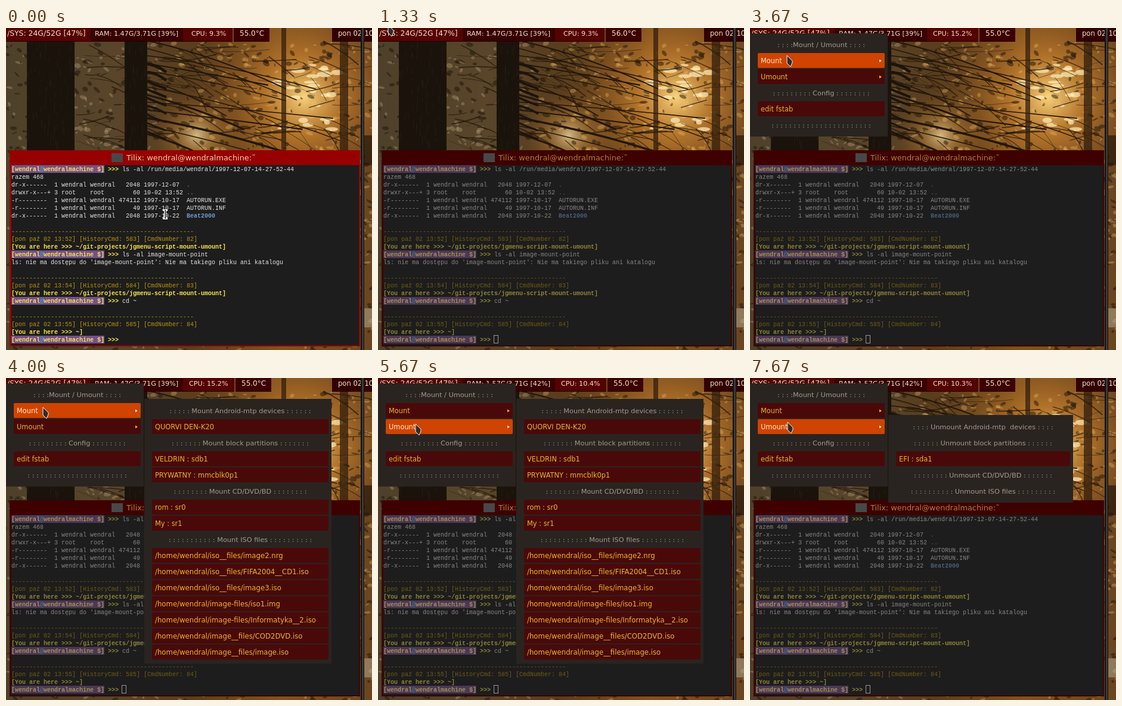
Recreate the animation shown at these times as an HTML page with a canvas. Size 614 by 540 pixels, loop 8000 ms.

```html
<!DOCTYPE html>
<html lang="pl">
<head>
<meta charset="utf-8">
<title>Mount menu</title>
<style>
html, body { margin: 0; width: 100%; height: 100%; overflow: hidden; background: #000; }
canvas { display: block; }
</style>
</head>
<body>
<canvas id="stage" width="614" height="540"></canvas>
<script>
const W = 614, H = 540, LOOP = 8000;
const SANS = '"DejaVu Sans", sans-serif';
const MONO = '"Liberation Mono", monospace';
const USER = 'wendral', HOST = 'wendralmachine';
let ctx = document.getElementById('stage').getContext('2d');

// Step tables: [first step, value]; three steps per second
const CPU = [[0, '9.3'], [5, '12.6'], [6, '14.1'], [7, '16.4'], [8, '15.9'], [9, '15.5'],
  [11, '15.2'], [13, '12.8'], [15, '11.0'], [17, '10.4'], [23, '10.3']];
const TEMP = [[0, 55], [2, 56], [5, 54], [8, 53], [11, 55]];
const RAM = [[0, '1.47G/3.71G [39%]'], [14, '1.57G/3.71G [42%]']];
const POINTER = [[0, [267, 312]], [1, [238, 262]], [2, [130, 120]], [3, [40, 22]], [4, [17, -5]],
  [5, [22, -2]], [6, [35, 5]], [7, [50, 6]], [8, [50, 8]], [10, [50, 26]], [11, [62, 46]],
  [12, [62, 49]], [16, [62, 53]], [17, [63, 77]], [23, [63, 74]]];
const at = (table, k) => table.findLast(e => e[0] <= k)[1];

function rect(x, y, w, h, color) {
  ctx.fillStyle = color;
  ctx.fillRect(x, y, w, h);
}

function text(s, x, y, color, size = 11.4, align = 'left') {
  ctx.font = `${size}px ${SANS}`;
  ctx.textAlign = align;
  ctx.fillStyle = color;
  ctx.fillText(s, x, y);
}

function poly(points, fill, stroke) {
  ctx.beginPath();
  points.forEach(([x, y]) => ctx.lineTo(x, y));
  ctx.closePath();
  ctx.fillStyle = fill;
  ctx.fill();
  if (stroke) { ctx.strokeStyle = stroke; ctx.lineWidth = 1; ctx.stroke(); }
}

function gradient(g, ...stops) {
  stops.forEach(([p, c]) => g.addColorStop(p, c));
  return g;
}

let seed = 11;
function rnd(a = 0, b = 1) {
  seed = (seed * 16807) % 2147483647;
  return a + (b - a) * seed / 2147483647;
}

function twig(x, y, dx, dy, width, color) {
  ctx.strokeStyle = color;
  ctx.lineWidth = width;
  ctx.beginPath();
  ctx.moveTo(x, y);
  ctx.quadraticCurveTo(x + dx * .5, y + dy * .35 + rnd(-5, 5), x + dx, y + dy);
  ctx.stroke();
}

function glow(x, y, r, inner, outer) {
  rect(x - r, y - r, 2 * r, 2 * r, gradient(ctx.createRadialGradient(x, y, 0, x, y, r),
    [0, inner], [.4, outer], [1, 'rgba(150,85,25,0)']));
}

// Sunlit forest, painted once
function paintForest() {
  rect(0, 0, W, H, gradient(ctx.createLinearGradient(0, 0, W, 0),
    [0, '#4e402a'], [.3, '#59452a'], [.5, '#593d1d'], [.75, '#80521f'], [1, '#6b4520']));
  glow(500, 115, 165, 'rgba(255,218,130,.95)', 'rgba(214,140,50,.6)');
  glow(320, 180, 75, 'rgba(250,225,165,.75)', 'rgba(200,145,70,.45)');
  for (let i = 0; i < 1500; i++) {
    const x = rnd(0, W), y = rnd(20, H), sunny = x > 270;
    ctx.fillStyle = rnd() < .5 ? 'rgba(30,20,9,.5)'
      : sunny ? 'rgba(245,195,105,.32)' : 'rgba(190,170,130,.35)';
    ctx.beginPath();
    ctx.ellipse(x, y, rnd(1, 7), rnd(1, 4), rnd(-.6, .9), 0, 7);
    ctx.fill();
  }
  for (let i = 0; i < 22; i++) {
    ctx.fillStyle = 'rgba(255,238,185,.7)';
    ctx.beginPath();
    ctx.ellipse(500 + rnd(-60, 60), 115 + rnd(-55, 60), rnd(3, 13), rnd(2, 5), 0, 0, 7);
    ctx.fill();
  }
  for (let i = 0; i < 110; i++)
    twig(rnd(115, 590), rnd(20, 190), rnd(20, 80), rnd(-15, 45), rnd(.5, 2), 'rgba(35,22,9,.7)');
  for (let i = 0; i < 13; i++)
    twig(232, 20 + i * 13, rnd(90, 330), rnd(25, 100), rnd(1, 3.5), '#22160b');
  for (const [x, w] of [[35, 80], [199, 38], [462, 8], [560, 14]]) {
    rect(x, 0, w, 206, w > 20 ? '#1a130c' : 'rgba(50,30,12,.75)');
    for (let i = 0; i < w; i++)
      rect(x + rnd(0, w), rnd(20, 195), 1, rnd(3, 16), 'rgba(85,65,40,.22)');
  }
  for (let i = 0; i < 9; i++)
    twig(234, 60 + i * 14, 35, 14, 5 - i * .3, '#1d140b');
  rect(601, 180, 13, 50, 'rgba(25,16,8,.6)');
  rect(601, 470, 13, 32, 'rgba(175,165,140,.55)');
}

const forest = document.createElement('canvas');
forest.width = W;
forest.height = H;
const screen = ctx;
ctx = forest.getContext('2d');
paintForest();
ctx = screen;

function drawBar(k) {
  const cpu = at(CPU, k), wide = cpu.length > 3;
  const tx = wide ? (k >= 11 ? 385 : 384) : 382;
  const box = (x, w, color) => {
    rect(x, 0, w, 23, color);
    rect(x, 22, w, 1, '#250000');
  };
  const ink = '#f6dfc5';
  box(0, 142, '#540202');
  box(142, 155, '#370000');
  box(297, tx - 299, '#540202');
  box(tx, 60, '#3c0000');
  box(547, 67, '#320000');
  text('/SYS: 24G/52G [47%]', 2, 13, ink, 12.4);
  text('RAM: ' + at(RAM, k), 149, 13, ink, 11.2);
  text(`CPU: ${cpu}%`, wide ? 307 : 311, 13, ink, 11.2);
  text(at(TEMP, k) + '.0°C', tx + 10, 13, ink, 12);
  text('pon 02-10', 557, 13, ink, 11.6);
  rect(595, 0, 6, H, '#141414');
  rect(597, 0, 3, H, '#383838');
}

function mono(s, col, row, color, bold) {
  ctx.font = `${bold ? 'bold ' : ''}10px ${MONO}`;
  ctx.textAlign = 'left';
  ctx.fillStyle = color;
  ctx.fillText(s, 9 + col * 6, 240 + row * 13);
}

const GOLD = '#b8930d', YELLOW = '#f8e350', WHITE = '#e6e6e6', BLUE = '#6f9bd0';

function prompt(row, command) {
  rect(9, 230 + row * 13, 156, 13, '#75508a');
  mono('[' + USER, 0, row, YELLOW, true);
  mono('@', 8, row, '#34a5c4', true);
  mono(HOST + ' $]', 9, row, YELLOW, true);
  mono('>>>', 27, row, YELLOW, true);
  mono(command, 31, row, WHITE);
}

function status(row, time, n, path) {
  mono('-'.repeat(51), 0, row, GOLD);
  mono(`[pon paź 02 ${time}] [HistoryCmd: ${501 + n}] [CmdNumber: ${n}]`, 0, row + 1, GOLD);
  mono(`[You are here >>> ${path}]`, 0, row + 2, YELLOW, true);
}

function drawTerminal(focused) {
  rect(6, 205, 588, 329, focused ? '#960000' : '#3e0000');
  rect(9, 230, 583, 302, '#1d1d1d');
  rect(177, 210, 19, 15, '#484848');
  text(`Tilix: ${USER}@${HOST}:˜`, 202, 222, focused ? '#efcfab' : '#b47c3b', 12.9);

  ctx.globalAlpha = focused ? 1 : .52;
  prompt(0, `ls -al /run/media/${USER}/1997-12-07-14-27-52-44`);
  mono('razem 468', 0, 1, WHITE);
  const own = USER + ' ' + USER;
  [['dr-x------  1', own, 2048, '1997-12-07', '.'],
   ['drwxr-x---+ 3', 'root    root   ', 60, '10-02 13:52', '..'],
   ['-r--------  1', own, 474112, '1997-10-17', 'AUTORUN.EXE'],
   ['-r--------  1', own, 49, '1997-10-17', 'AUTORUN.INF'],
   ['dr-x------  1', own, 2048, '1997-10-22', 'Beat2000']
  ].forEach(([mode, owner, size, date, name], i) => {
    mono(`${mode} ${owner} ${String(size).padStart(6)} ${date}`, 0, i + 2, WHITE);
    const dir = mode[0] === 'd';
    mono(name, 49, i + 2, dir ? BLUE : WHITE, dir && i > 1);
  });
  const repo = '~/git-projects/jgmenu-script-mount-umount';
  status(8, '13:52', 82, repo);
  prompt(11, 'ls -al image-mount-point');
  mono("ls: nie ma dostępu do 'image-mount-point': Nie ma takiego pliku ani katalogu", 0, 12, WHITE);
  status(14, '13:54', 83, repo);
  prompt(17, 'cd ~');
  status(19, '13:55', 84, '~');
  prompt(22, '');
  ctx.globalAlpha = 1;
  if (!focused) {
    ctx.strokeStyle = '#959595';
    ctx.lineWidth = 1;
    ctx.strokeRect(194.5, 515.5, 7, 13);
  }
}

const dots = n => Array(n).fill(':').join(' ');
const title = (before, s, after) => ({ title: `${dots(before)} ${s} ${dots(after)}` });
const home = s => `/home/${USER}/${s}`;

const MAIN = { x: 0, y: 9, w: 231, h: 173, first: 28, left: 13, right: 226, arrows: true, rows: [
  { title: ': : : :Mount / Umount : : : :' }, 'Mount', 'Umount',
  title(9, 'Config', 8), 'edit fstab', { title: dots(23) }] };
const MOUNT = { x: 232, y: 35, w: 314, h: 444, first: 55, left: 245, right: 541, rows: [
  title(5, 'Mount Android-mtp devices', 6), 'QUORVI DEN-K20',
  title(7, 'Mount block partitions', 7), 'VELDRIN : sdb1', 'PRYWATNY : mmcblk0p1',
  title(8, 'Mount CD/DVD/BD', 8), 'rom : sr0', 'My : sr1',
  title(11, 'Mount ISO files', 10),
  ...['iso__files/image2.nrg', 'iso__files/FIFA2004__CD1.iso', 'iso__files/image3.iso',
    'image-files/iso1.img', 'image-files/Informatyka__2.iso', 'image__files/COD2DVD.iso',
    'image__files/image.iso'].map(home)] };
const UNMOUNT = { x: 232, y: 62, w: 310, h: 147, first: 82, left: 245, right: 537, rows: [
  title(4, 'Unmount Android-mtp  devices', 4), title(6, 'Unmount block partitions', 6),
  'EFI : sda1', title(8, 'Unmount CD/DVD/BD', 7), title(10, 'Unmount ISO files', 9)] };

function drawMenu(m, active) {
  rect(m.x, m.y, m.w, m.h, '#2a2420');
  m.rows.forEach((row, i) => {
    const y = m.first + i * 27;
    if (row.title) {
      text(row.title, (m.left + m.right) / 2, y + 4, '#a39a8c', 11.3, 'center');
      return;
    }
    const on = row === active;
    ctx.fillStyle = on ? '#d04300' : '#4a0909';
    ctx.beginPath();
    ctx.roundRect(m.left, y - 13, m.right - m.left, 25, 2);
    ctx.fill();
    text(row, m.left + 5, y + 4, on ? '#ffe9c4' : '#e9b52d', row[0] === '/' ? 11.7 : 11.4);
    if (m.arrows && i < 3)
      poly([[217, y - 2.5], [221, y], [217, y + 2.5]], on ? '#ffe9c4' : '#e9b52d');
  });
}

function drawPointer([x, y]) {
  if (y > 205) {
    rect(x - 4, y - 8, 8, 3, '#fff');
    rect(x - 4, y + 6, 8, 3, '#fff');
    rect(x - 2, y - 7, 4, 15, '#fff');
    rect(x - .5, y - 7, 1.5, 15, '#111');
    return;
  }
  poly([[0, 0], [9, 9], [9, 12], [6, 19], [0, 13]].map(([a, b]) => [x + a, y + b]),
    '#2d2d2d', '#f2f2f2');
}

function draw(t) {
  const k = Math.floor((t + 3.4) * 3 / 1000) % 24;
  ctx.drawImage(forest, 0, 0);
  drawTerminal(k < 4);
  drawBar(k);
  if (k >= 9) {
    ctx.globalAlpha = k === 9 ? .8 : 1;
    drawMenu(MAIN, k < 17 ? 'Mount' : 'Umount');
    ctx.globalAlpha = 1;
  }
  if (k >= 12) drawMenu(k < 18 ? MOUNT : UNMOUNT);
  drawPointer(at(POINTER, k));
}

const start = performance.now();
function tick() {
  draw((performance.now() - start) % LOOP);
  requestAnimationFrame(tick);
}
tick();
</script>
</body>
</html>
```
